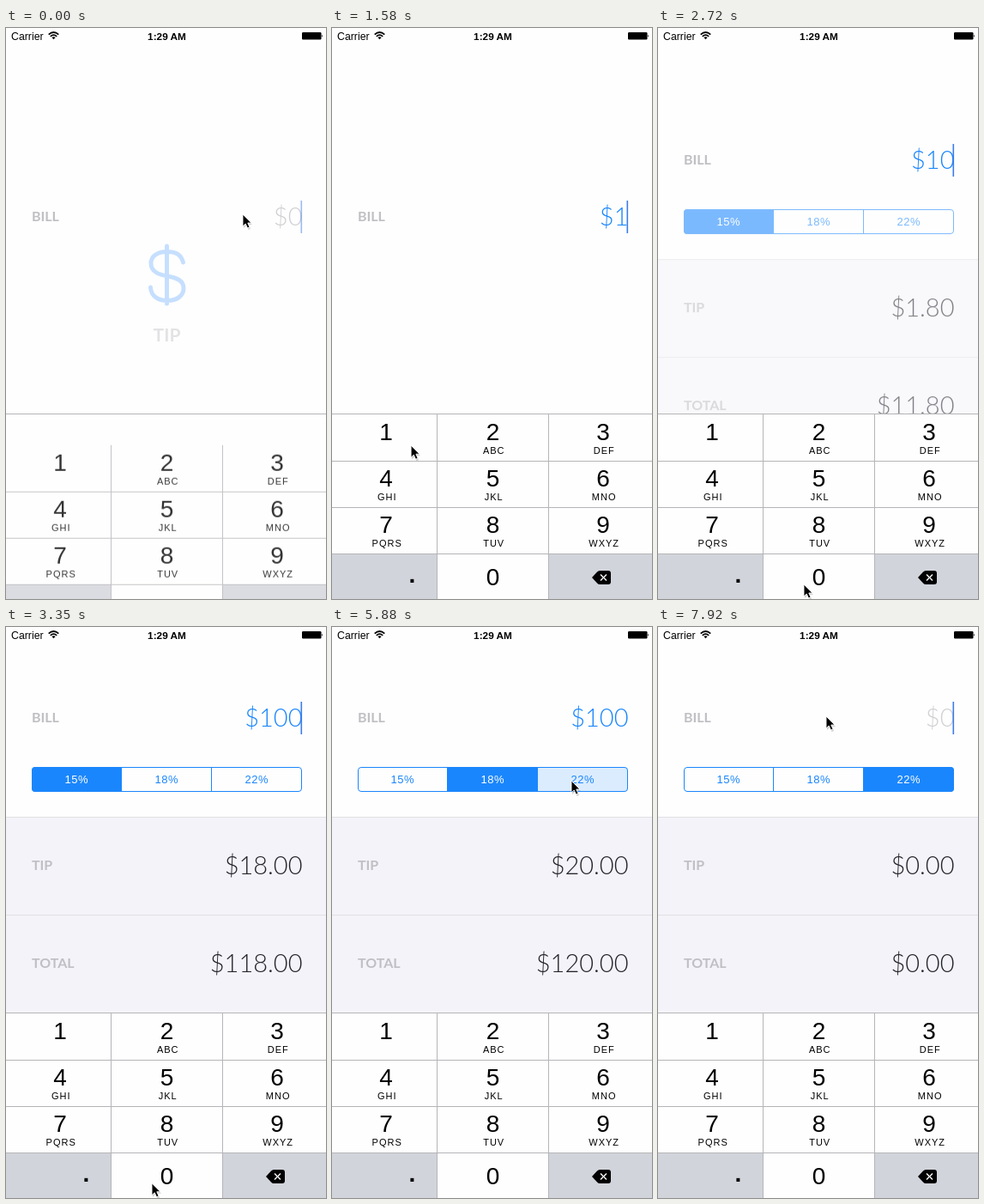
Write an HTML page that moves like this. It is 373 px wide and 665 px high and loops after 8000 ms.

```html
<!DOCTYPE html>
<html lang="en">
<head>
<meta charset="utf-8">
<title>Tip calculator</title>
<style>
  html, body { margin: 0; width: 100%; height: 100%; overflow: hidden; background: #fefefe; }
  svg { display: block; width: 373px; height: 665px; font-family: "Liberation Sans", Arial, sans-serif; }
  .label, .money { font-family: Lato, sans-serif; }
  .label { font-size: 16px; font-weight: 700; fill: #bfbfc4; }
  .money { font-size: 29px; font-weight: 300; fill: #24242c; text-anchor: end; }
  .mid { text-anchor: middle; }
  .digit { font-size: 28px; text-anchor: middle; }
  .letters { font-size: 11px; letter-spacing: 1px; text-anchor: middle; }
  .segment { font-size: 13px; letter-spacing: .5px; text-anchor: middle; }
  .rule { fill: none; stroke: #b5b5b9; }
</style>
</head>
<body>
<svg viewBox="0 0 373 665">
  <rect width="373" height="665" fill="#fefefe"/>

  <text x="6" y="13.5" font-size="12.3">Carrier</text>
  <g fill="none" stroke="#000" stroke-width="1.7">
    <path d="M49.7 7.6Q55.5 2.4 61.3 7.6M51.8 9.8Q55.5 6.4 59.2 9.8"/>
    <path d="M53.4 11L55.5 13.2 57.6 11Q55.5 9.4 53.4 11Z" fill="#000" stroke="none"/>
  </g>
  <text class="mid" x="187.5" y="13.5" font-size="11.8" font-weight="700">1:29 AM</text>
  <rect x="345" y="5" width="22.5" height="8.5" rx="1.2"/>
  <path d="M368 7.5q1.8 1.7 0 3.6z"/>

  <g id="splash">
    <path d="M187.5 254V321M206.5 273C204 263 197 260.500 188 260.500C176 260.500 169 266 169 274C169 284 178 287 188 289C199 291 207 294 207 303C207 312 199 317.500 188 317.500C177 317.500 169 312 168.500 302"
      fill="none" stroke="#a9cfff" stroke-width="5" stroke-linecap="round"/>
    <text class="label mid" x="187.5" y="364.500" style="font-size:21px;fill:#d5d5d8">TIP</text>
  </g>

  <g id="panel">
    <rect y="221" width="373" height="229" fill="#f4f3f9"/>
    <path d="M0 221.500H373M0 335.500H373" stroke="#e0e0e4"/>
    <g id="segments"></g>
    <text class="label" x="30" y="283">TIP</text>
    <text class="money" id="tip" x="345.500" y="287.500"></text>
    <text class="label" x="30" y="397">TOTAL</text>
    <text class="money" id="total" x="345.500" y="401.500"></text>
  </g>

  <g id="billRow">
    <text class="label" x="30" y="225">BILL</text>
    <text class="money" id="bill" x="345.500" y="229.500"></text>
    <rect id="caret" x="343.500" y="201" width="1.600" height="38" fill="#3b7dec"/>
  </g>

  <rect y="449" width="373" height="216" fill="#fefefe"/>
  <g id="keyboard"></g>
  <path class="rule" d="M0 449.500H373"/>

  <g id="pointer">
    <path d="M1 2V16L4 13 6.500 18 9 17 7 12H11Z" fill="#000" opacity=".18"/>
    <path d="M0 0V14L3.200 11 5.500 16 8 15 5.800 10H10Z" stroke="#fff" stroke-width=".9"/>
  </g>
</svg>
<script>
const LOOP = 8000;
const $ = id => document.getElementById(id);
const clamp = v => Math.min(1, Math.max(0, v));
const ramp = (t, from, to) => clamp((t - from) / (to - from));
const ease = p => p * p * (3 - 2 * p);
const within = (t, from, to) => t >= from && t < to;
const money = v => '$' + v.toFixed(2);

// Static parts
const columns = [63, 187.5, 316];
const letters = ['', 'ABC', 'DEF', 'GHI', 'JKL', 'MNO', 'PQRS', 'TUV', 'WXYZ'];
$('keyboard').innerHTML =
  '<rect y="613" width="122" height="52" fill="#d1d4db"/><rect x="253" y="613" width="120" height="52" fill="#d1d4db"/>' +
  '<rect id="keyOne" y="450" width="122" height="54" fill="#d1d4db"/>' +
  '<rect id="keyZero" x="123" y="613" width="129" height="52" fill="#d1d4db"/>' +
  letters.map((word, i) => {
    const x = columns[i % 3], y = 480 + 54 * Math.floor(i / 3);
    return `<text class="digit" x="${x}" y="${y}">${i + 1}</text>
      <text class="letters" x="${x + 1.2}" y="${y + 15.5}">${word}</text>`;
  }).join('') +
  `<text class="digit" x="187.5" y="649">0</text>
  <text class="digit" x="93.5" y="646" font-weight="700">.</text>
  <path d="M303 640L309 633.500Q310.500 632 312 632H322Q325 632 325 635V645Q325 648 322 648H312Q310.500 648 309 646.500Z"/>
  <path d="M313 636.500l7 7m0-7l-7 7" stroke="#fff" stroke-width="1.300"/>
  <path class="rule" d="M0 504.500H373M0 558.500H373M0 612.500H373M122.500 450V665M252.500 450V665"/>`;

const blue = '#1a86fd';
$('segments').innerHTML =
  '<clipPath id="pill"><rect x="30" y="163" width="315" height="29" rx="4"/></clipPath><g clip-path="url(#pill)">' +
  [0, 1, 2].map(i => `<rect class="fill" x="${30 + 105 * i}" y="163" width="105" height="29" fill="${blue}"/>`).join('') +
  `</g><rect x="30.500" y="163.500" width="314" height="28" rx="3.500" fill="none" stroke="${blue}"/>
  <path d="M134.500 163V192M239.500 163V192" stroke="${blue}"/>` +
  ['15%', '18%', '22%'].map((s, i) => `<text class="segment" x="${82.3 + 105 * i}" y="182">${s}</text>`).join('');
const fills = document.querySelectorAll('.fill');
const captions = document.querySelectorAll('.segment');

// Pointer stops: time, x, y
const stops = [
  [0, 276, 217], [80, 276, 217], [790, 141, 472], [1140, 92, 486], [1570, 92, 486],
  [2100, 165, 625], [2340, 170, 648], [3340, 170, 648], [4140, 203, 180], [4230, 204, 181],
  [4900, 204, 181], [5610, 279, 179], [6420, 279, 179], [7290, 32, 103], [7560, 29, 103],
  [7660, 29, 104], [7920, 196, 104], [8000, 215, 104]
];
function pointerAt(t) {
  const i = Math.max(1, stops.findIndex(s => s[0] > t));
  const [a, b] = [stops[i - 1], stops[i]];
  const p = ease(ramp(t, a[0], b[0]));
  return [1, 2].map(k => a[k] + (b[k] - a[k]) * p);
}

const billAt = t => t < 1550 || t >= 7830 ? 0 : t < 2500 ? 1 : t < 2950 ? 10 : 100;

function caretAt(t) {
  if (within(t, 1550, 3400) || t >= 7830) return 1;
  const phase = (t + 50) % 1000;
  return ramp(phase, 0, 100) - ramp(phase, 500, 650);
}

function drawSegments(t) {
  const toSecond = ramp(t, 4530, 4730), toThird = ramp(t, 6010, 6210);
  const selected = [1 - toSecond, toSecond - toThird, toThird];
  const pressed = [false, within(t, 4490, 4730), within(t, 5880, 6210)];
  selected.forEach((s, i) => {
    fills[i].setAttribute('opacity', s + (pressed[i] ? .15 * (1 - s) : 0));
    const mix = [26, 134, 253].map(c => Math.round(c + (255 - c) * s));
    captions[i].setAttribute('fill', `rgb(${mix})`);
  });
}

function draw(t) {
  const bill = billAt(t);
  const rate = t < 4600 ? .18 : t < 6100 ? .2 : .22;
  const open = ease(ramp(t, 2500, 2900));
  const rise = 1 - ramp(t, 0, 250);

  $('bill').textContent = '$' + bill;
  $('bill').style.fill = bill ? blue : '#d0d0d4';
  $('tip').textContent = money(bill * rate);
  $('total').textContent = money(bill * (1 + rate));
  $('caret').setAttribute('opacity', caretAt(t));
  $('billRow').setAttribute('transform', `translate(0 ${-114 * open})`);
  $('panel').setAttribute('transform', `translate(0 ${114 * (1 - open)})`);
  $('panel').setAttribute('opacity', open);
  $('splash').setAttribute('opacity', .65 * rise);
  $('keyboard').setAttribute('transform', `translate(0 ${36 * rise * rise})`);
  $('keyboard').setAttribute('opacity', 1 - .2 * rise);
  $('keyOne').setAttribute('opacity', +within(t, 1410, 1570));
  $('keyZero').setAttribute('opacity', +(within(t, 2380, 2520) || within(t, 2840, 3000)));
  drawSegments(t);
  $('pointer').setAttribute('transform', `translate(${pointerAt(t)})`);
}

const start = performance.now();
function frame() {
  draw((performance.now() - start) % LOOP);
  requestAnimationFrame(frame);
}
frame();
</script>
</body>
</html>
```
